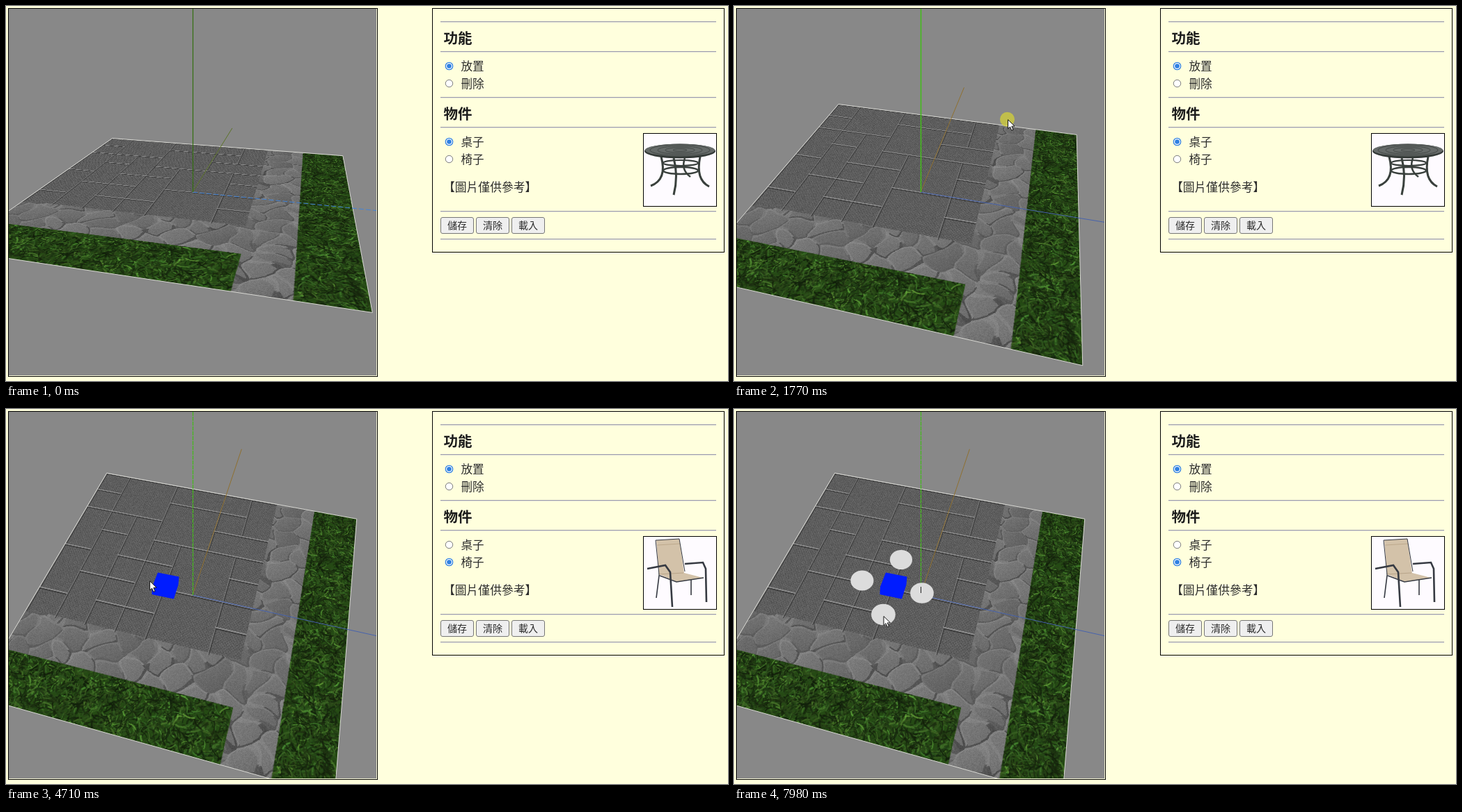
Write an HTML page with a canvas that moves like this. It is 1037 by 540 pixels and loops after 8 s.

```html
<!DOCTYPE html>
<html lang="zh-Hant">
<head>
<meta charset="utf-8">
<title>Garden planner</title>
<style>
  html, body { margin: 0; width: 100%; height: 100%; overflow: hidden; background: #ffffdd; }
  #view { position: absolute; left: 4px; top: 4px; width: 528px; height: 528px; overflow: hidden; background: #888; }
  #ground { position: absolute; left: -56px; top: -56px; }
  #stage { position: absolute; left: 0; top: 0; }
</style>
</head>
<body>
<div id="view"><canvas id="ground" width="640" height="640"></canvas></div>
<canvas id="stage" width="1037" height="540"></canvas>
<script>
const LOOP = 8000, SIZE = 640, CELL = SIZE / 10;
const ground = document.getElementById('ground');
const ctx = document.getElementById('stage').getContext('2d');
const CJK = '"Noto Sans CJK TC", "Noto Sans CJK", sans-serif';

let seed = 77;
const rnd = () => (seed = seed * 16807 % 2147483647) / 2147483647;
const span = (t, from, to) => Math.min(1, Math.max(0, (t - from) / (to - from)));
const easeOut = k => 1 - (1 - k) ** 3;
const linear = k => k;

// ---- Ground texture ----

// Rough slabs top left, crazy paving elsewhere.
function paintStone(g) {
  const step = 46, n = Math.ceil(SIZE / step) + 2, sites = [];
  for (let i = 0; i < n * n; i++) {
    sites.push({ x: (i % n - 1 + rnd()) * step, y: (Math.floor(i / n) - 1 + rnd()) * step, tone: rnd() });
  }
  const img = g.createImageData(SIZE, SIZE);
  for (let y = 0; y < SIZE; y++) for (let x = 0; x < SIZE; x++) {
    let v;
    if (x < 7 * CELL && y < 6.92 * CELL) {
      v = 93 + 10 * Math.sin(x * 1.05 + Math.sin(y / 9)) * Math.sin(y * 0.9) + (rnd() - 0.5) * 30;
    } else {
      const wx = x + 6 * Math.sin(y / 11), wy = y + 6 * Math.sin(x / 13);
      const cx = Math.floor(x / step) + 1, cy = Math.floor(y / step) + 1;
      let d1 = 1e9, d2 = 1e9, near;
      for (let j = Math.max(0, cy - 2); j <= Math.min(n - 1, cy + 2); j++)
        for (let i = Math.max(0, cx - 2); i <= Math.min(n - 1, cx + 2); i++) {
          const s = sites[j * n + i], d = Math.hypot(s.x - wx, s.y - wy);
          if (d < d1) { d2 = d1; d1 = d; near = s; } else if (d < d2) d2 = d;
        }
      const side = wx - near.x + wy - near.y;
      v = 104 + near.tone * 14 - side * 0.15 + (rnd() - 0.5) * 22;
      if (d2 - d1 < 6) v += side > 10 ? -34 * near.tone : 10;
    }
    const p = (y * SIZE + x) * 4;
    img.data.fill(v, p, p + 3);
    img.data[p + 3] = 255;
  }
  g.putImageData(img, 0, 0);
}

function paintSlab(g, x, y, w, h) {
  g.fillStyle = 'rgba(40,40,40,.6)';
  g.fillRect(x, y + 2, w, 3);
  g.fillRect(x + 2, y, 2, h);
  g.fillStyle = 'rgba(146,146,146,.9)';
  g.fillRect(x, y - 1, w, 3);
  g.fillStyle = 'rgba(136,136,136,.55)';
  g.fillRect(x, y, 2, h);
}

// Lay a repeating run of slab sizes into a 7 by 7 grid, trimming to fit.
function paintSlabs(g) {
  const sizes = [[1, 1], [2, 2], [3, 1], [1, 2]], taken = new Set();
  let next = 0;
  for (let y = 0; y < 7; y++) for (let x = 0; x < 7; x++) {
    if (taken.has(y * 7 + x)) continue;
    const [maxW, maxH] = sizes[next++ % sizes.length];
    let w = 1;
    while (w < maxW && x + w < 7 && !taken.has(y * 7 + x + w)) w++;
    const h = Math.min(maxH, 7 - y);
    for (let j = 0; j < h; j++) for (let i = 0; i < w; i++) taken.add((y + j) * 7 + x + i);
    paintSlab(g, x * CELL, y * CELL, w * CELL, h * CELL);
  }
}

function paintGrass(g, x, y, w, h) {
  g.save();
  g.beginPath();
  g.rect(x, y, w, h);
  g.clip();
  g.fillStyle = '#254a14';
  g.fillRect(x, y, w, h);
  for (let i = w * h / 22; i > 0; i--) {
    const px = x + rnd() * w, py = y + rnd() * h, a = rnd() * 6.28, r = 6 + rnd() * 9;
    g.strokeStyle = `hsla(${92 + rnd() * 14},48%,${7 + rnd() * rnd() * 42}%,.75)`;
    g.lineWidth = 1.2 + rnd() * 2;
    g.beginPath();
    g.moveTo(px, py);
    g.quadraticCurveTo(px + r * Math.cos(a), py + r * Math.sin(a),
      px + r * 1.6 * Math.cos(a + 0.4), py + r * 1.6 * Math.sin(a + 0.4));
    g.stroke();
  }
  g.restore();
}

function paintGround() {
  const g = ground.getContext('2d');
  paintStone(g);
  paintSlabs(g);
  paintGrass(g, 0.843 * SIZE, 0, 0.157 * SIZE, SIZE);
  paintGrass(g, 0, 0.841 * SIZE, 0.71 * SIZE, 0.159 * SIZE);
}

// ---- Orbit camera ----

const SCALE = 219, DISTANCE = 2.9, CENTRE = 268;
const DRAG = [1440, 2110];
const RAD = Math.PI / 180;

function camera(t) {
  const k = span(t, ...DRAG);
  const tilt = 66.2 - 30.7 * k, turn = 14 + 1.25 * k;
  ground.style.transform = `perspective(${SCALE * DISTANCE}px) rotateX(${tilt}deg) ` +
    `rotateZ(${turn}deg) scale(${2 * SCALE / SIZE})`;
  const sin = Math.sin(turn * RAD), cos = Math.cos(turn * RAD);
  // The ground reaches from -1 to 1 on both axes; z points away from the viewer.
  return (x, z) => {
    const side = x * cos + z * sin, away = z * cos - x * sin;
    const zoom = SCALE / (1 + away * Math.sin(tilt * RAD) / DISTANCE);
    return [CENTRE + side * zoom, CENTRE - away * Math.cos(tilt * RAD) * zoom];
  };
}

// ---- Drawing helpers ----

function line(color, width, ...p) {
  ctx.strokeStyle = color;
  ctx.lineWidth = width;
  ctx.beginPath();
  for (let i = 0; i < p.length; i += 2) ctx.lineTo(p[i], p[i + 1]);
  ctx.stroke();
}

function shape(color, ...p) {
  ctx.fillStyle = color;
  ctx.beginPath();
  for (let i = 0; i < p.length; i += 2) ctx.lineTo(p[i], p[i + 1]);
  ctx.closePath();
  ctx.fill();
}

function oval(x, y, rx, ry, fill, stroke, width = 1) {
  ctx.beginPath();
  ctx.ellipse(x, y, rx, ry, 0, 0, Math.PI * 2);
  if (fill) { ctx.fillStyle = fill; ctx.fill(); }
  if (stroke) { ctx.strokeStyle = stroke; ctx.lineWidth = width; ctx.stroke(); }
}

function frame(x, y, w, h) {
  ctx.strokeStyle = '#000';
  ctx.lineWidth = 1;
  ctx.strokeRect(x, y, w, h);
}

function text(str, x, y, size, weight = 300, color = '#2c2c2c') {
  ctx.font = `${weight} ${size}px ${CJK}`;
  ctx.fillStyle = color;
  ctx.fillText(str, x, y);
}

// ---- Side panel ----

function radio(label, y, on) {
  const blue = '#2f80e2';
  oval(636.5, y, 5.2, 5.2, '#fff', on ? blue : '#767676', on ? 1.3 : 1);
  if (on) oval(636.5, y, 3.3, 3.3, blue);
  text(label, 653.5, y, 16.6);
}

function button(label, x) {
  ctx.beginPath();
  ctx.roundRect(x + 0.5, 304.5, 47, 23, 2.5);
  ctx.fillStyle = '#efefef';
  ctx.fill();
  ctx.strokeStyle = '#767676';
  ctx.lineWidth = 1;
  ctx.stroke();
  text(label, x + 10, 316, 14);
}

function curve(color, width, x0, y0, cx, cy, x1, y1) {
  ctx.strokeStyle = color;
  ctx.lineWidth = width;
  ctx.beginPath();
  ctx.moveTo(x0, y0);
  ctx.quadraticCurveTo(cx, cy, x1, y1);
  ctx.stroke();
}

function table() {
  const iron = '#39403c';
  curve(iron, 3, 941, 217, 950, 250, 926, 259);
  curve(iron, 3, 997, 217, 990, 250, 1010, 260);
  curve(iron, 3, 959, 219, 966, 245, 959, 272);
  curve(iron, 2.5, 975, 219, 969, 236, 983, 246);
  oval(969, 226, 25, 4, null, iron, 2);
  oval(969, 237, 25, 5, null, iron, 2.5);
  oval(968, 209, 51, 10.5, '#343a37');
  oval(968, 207.5, 50, 9, '#666b69');
  for (let r = 10; r < 50; r += 11) oval(968, 207.5, r, r * 0.18, null, '#424745');
}

function chair() {
  const iron = '#363a42', cloth = '#d3c2a9';
  line(iron, 1.6, 939, 232, 934, 272);
  line(iron, 1.6, 984, 246, 984, 268);
  shape(cloth, 934, 189, 967, 187, 974, 236, 1001, 243, 964, 249, 938, 238);
  line('#b8a58a', 1, 938, 238, 973, 236);
  line('#bda98c', 1, 935, 196, 968, 194);
  line(iron, 1, 938, 238, 933, 189, 967, 187, 975, 234);
  line(iron, 1.4, 939, 240, 963, 249, 1002, 243);
  line(iron, 2.6, 921, 230, 947, 225, 954, 235, 957, 285);
  line(iron, 2.6, 975, 223, 1001, 221, 1005, 230, 1006, 278);
}

function panel(t) {
  frame(612.5, 3.5, 419, 351);
  for (const y of [23, 66, 132, 175, 296, 336]) {
    line('#9c9cac', 1, 624, y - 0.5, 1020, y - 0.5);
    line('#e4e4d8', 1, 624, y + 0.5, 1020, y + 0.5);
  }
  text('功能', 628.5, 46, 20.5, 700, '#1c1c1c');
  text('物件', 628.5, 155, 20.5, 700, '#1c1c1c');
  const picked = t >= 4090;
  radio('放置', 86.5, true);
  radio('刪除', 111.5, false);
  radio('桌子', 195.5, !picked);
  radio('椅子', 220.5, picked);
  text('【圖片僅供參考】', 628, 260.5, 16.8);
  ['儲存', '清除', '載入'].forEach((label, i) => button(label, 624 + 51 * i));
  ctx.fillStyle = '#fefbff';
  ctx.fillRect(915, 183, 106, 106);
  if (t >= 4240) chair(); else table();
  frame(915.5, 183.5, 105, 105);
}

// ---- Pointer and placed objects ----

// Each move ends at a point; some then place an object there.
const MOVES = [
  { from: 190, to: 1110, x: 393, y: 140 },
  { from: DRAG[0], to: DRAG[1], x: 393, y: 187, ease: linear },
  { from: 2190, to: 2760, x: 229.5, y: 259, put: cube, at: 2910 },
  { from: 3170, to: 3990, x: 640, y: 215 },
  { from: 4190, to: 5010, x: 184, y: 249, put: ball, at: 5380 },
  { from: 5380, to: 6150, x: 240, y: 219, put: ball, at: 6220 },
  { from: 6220, to: 6740, x: 270, y: 267, put: ball, at: 6890 },
  { from: 6890, to: 7360, x: 214.5, y: 298, put: ball, at: 7910 }
];

function cube(x, y) {
  ctx.save();
  ctx.translate(x, y);
  shape('#001cff', -11.5, -23.5, 19, -17.5, 18, -6, 11.5, 14.5, -20, 8, -19.5, -3);
  ctx.restore();
}

function ball(x, y) {
  const r = 16.7 + (y - 258) / 60;
  oval(x, y - 2, r, r * 0.88, '#dcdcdc');
}

function pointer(t) {
  if (t < 190) return;
  let x = 978, y = 504;
  for (const m of MOVES) {
    const k = (m.ease || easeOut)(span(t, m.from, m.to));
    x += (m.x - x) * k;
    y += (m.y - y) * k;
  }
  if (t >= 1060 && t < 2190) oval(x - 0.5, y, 10.5, 10.5, 'rgba(216,214,50,.7)');
  ctx.save();
  ctx.translate(x, y);
  const arrow = new Path2D('M.5 .5V13.5L3.5 10.8L5.8 16L8 15L5.8 10L10 9.8Z');
  ctx.fillStyle = '#fff';
  ctx.fill(arrow);
  ctx.strokeStyle = '#111';
  ctx.lineWidth = 1;
  ctx.stroke(arrow);
  ctx.restore();
}

function scene(t) {
  const at = camera(t), moved = t >= DRAG[0], settled = t >= DRAG[1];
  frame(3.5, 3.5, 530, 530);
  ctx.save();
  ctx.beginPath();
  ctx.rect(4, 4, 528, 528);
  ctx.clip();

  line('#d9d9d4', 1, ...at(-1, 1), ...at(1, 1), ...at(1, -1), ...at(-1, -1), ...at(-1, 1));
  line(moved ? '#8f7030' : '#5c7428', 1, CENTRE, CENTRE, ...at(0, 1.6));
  ctx.setLineDash(moved ? [] : [7, 3]);
  line(moved ? '#4763ad' : '#4384d6', 1, CENTRE, CENTRE, ...at(1.6, 0));
  ctx.setLineDash(settled ? [6, 1] : []);
  line(moved ? '#44bb1c' : '#347012', moved && !settled ? 1.6 : 1.2, 268.5, 4, 268.5, CENTRE);
  ctx.setLineDash([]);

  for (const m of MOVES) if (m.put && t >= m.at) m.put(m.x, m.y);
  if (t >= 6890) line('#222', 1, 268.5, 256, 268.5, 265);
  ctx.restore();
}

function draw(now) {
  const t = (now - start) % LOOP;
  ctx.clearRect(0, 0, 1037, 540);
  ctx.textBaseline = 'middle';
  panel(t);
  scene(t);
  pointer(t);
  requestAnimationFrame(() => draw(performance.now()));
}

paintGround();
const start = performance.now();
draw(start);
</script>
</body>
</html>
```
